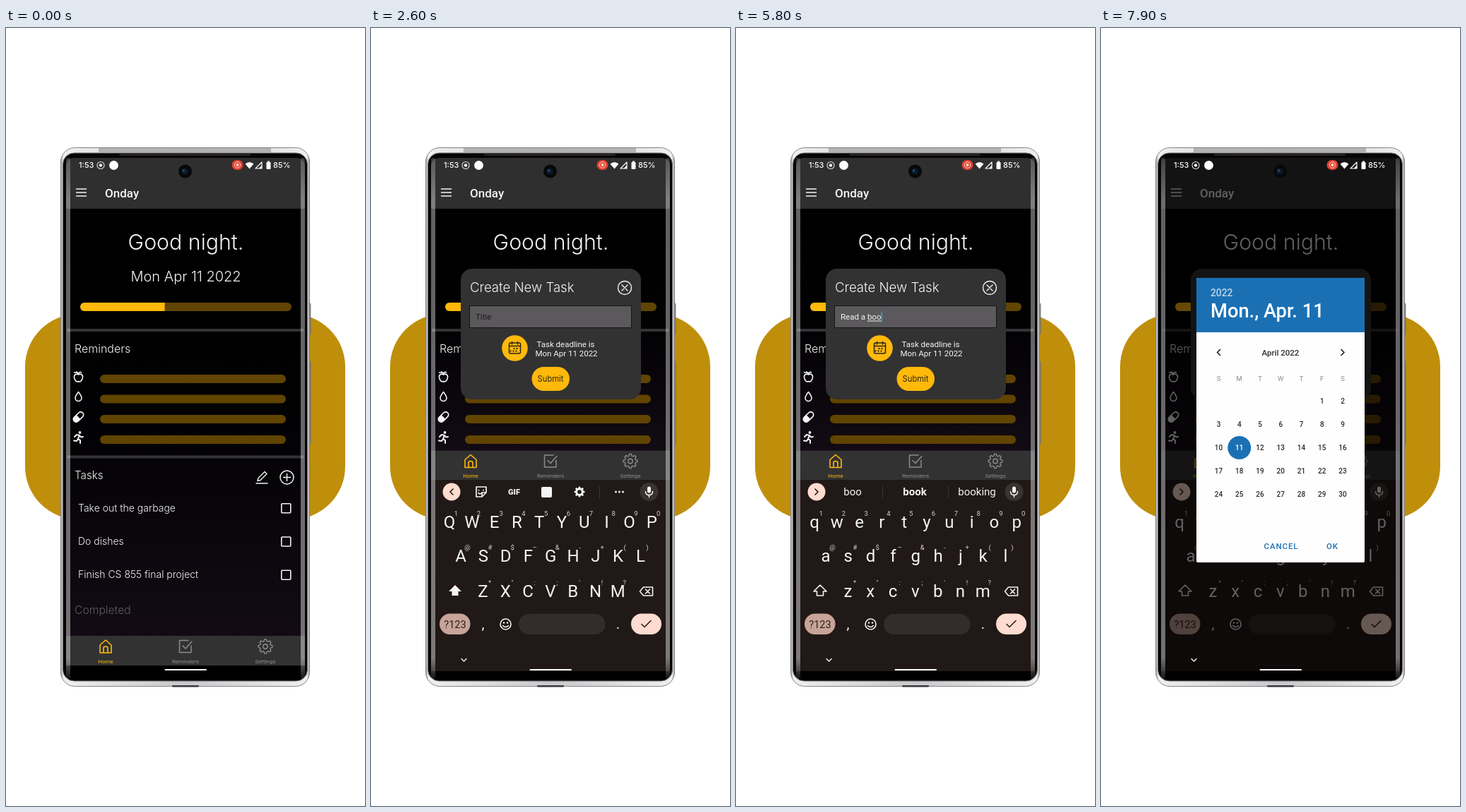
These frames come from a looping animation (508x1102 px, 8 s). An HTML page with a canvas:

```html
<!DOCTYPE html>
<html lang="en">
<head>
<meta charset="utf-8">
<title>Task app</title>
<style>
html, body { margin: 0; width: 100%; height: 100%; overflow: hidden; background: #fff; }
canvas { display: block; width: 508px; height: 1102px; }
</style>
</head>
<body>
<canvas id="stage" width="508" height="1102"></canvas>
<script>
const ctx = document.getElementById('stage').getContext('2d');
const LOOP = 8000, STEP = 100;
const GOLD = '#ffb90a', TRACK = '#604400', WHITE = '#f4f4f4', PEACH = '#ffdccf', PANEL = '#323232';
const INTER = 'Inter, sans-serif', ROBOTO = 'Roboto, sans-serif';

const TASKS = ['Take out the garbage', 'Do dishes', 'Finish CS 855 final project'];
const STROKES = [[3500, 'R'], [3700, 'e'], [4000, 'a'], [4300, 'd'], [4600, ' '], [5000, 'a'],
  [5200, ' '], [5300, 'b'], [5600, 'o'], [5700, 'o'], [5900, 'k']];
const HINTS = ['', 'R Really Right', 'Re Really Red', 'Rea Res Real', 'Read Reading Ready', 'the a it',
  'a and an', 'book good little', 'b bit book', 'bo book box', 'boo book booking', 'book booking booklet'];
const ROWS = [
  { keys: 'QWERTYUIOP', marks: '1234567890', x: 111, y: 699 },
  { keys: 'ASDFGHJKL', marks: '@#$–&-+()', x: 127, y: 747 },
  { keys: 'ZXCVBNM', marks: '*":;\'!?', x: 158.5, y: 797 }
];
const KEY_STEP = 31.8;

const clamp = v => Math.max(0, Math.min(1, v));

function box(x, y, w, h, r, fill, stroke, lw = 1) {
  ctx.beginPath();
  ctx.roundRect(x, y, w, h, r);
  if (fill) { ctx.fillStyle = fill; ctx.fill(); }
  if (stroke) { ctx.strokeStyle = stroke; ctx.lineWidth = lw; ctx.stroke(); }
}

function disc(x, y, r, fill, stroke, lw = 1) {
  box(x - r, y - r, 2 * r, 2 * r, r, fill, stroke, lw);
}

// y is the middle of the capital letters
function text(s, x, y, size, color = WHITE, { font = ROBOTO, weight = 400, align = 'left', spacing = 0 } = {}) {
  ctx.font = `${weight} ${size}px ${font}`;
  ctx.letterSpacing = spacing + 'px';
  ctx.textAlign = align;
  ctx.fillStyle = color;
  ctx.fillText(s, x, y + size * 0.36);
}

const geo = (s, x, y, size, color, opts) => text(s, x, y, size, color, { font: INTER, weight: 300, ...opts });
const mid = (s, x, y, size, color, opts) => text(s, x, y, size, color, { align: 'center', ...opts });

// Icon paths are centred on the origin
function icon(d, x, y, { color = WHITE, lw = 1.5, fill = false, scale = 1 } = {}) {
  ctx.save();
  ctx.translate(x, y);
  ctx.scale(scale, scale);
  ctx.lineCap = ctx.lineJoin = 'round';
  ctx.lineWidth = lw;
  ctx.strokeStyle = ctx.fillStyle = color;
  const p = new Path2D(d);
  fill ? ctx.fill(p) : ctx.stroke(p);
  ctx.restore();
}

function gear(x, y, r, color, solid) {
  ctx.beginPath();
  for (let i = 0; i <= 96; i++) {
    const a = i / 96 * Math.PI * 2, q = r * (0.88 + 0.12 * Math.tanh(3 * Math.cos(8 * a)));
    ctx.lineTo(x + q * Math.cos(a), y + q * Math.sin(a));
  }
  ctx.closePath();
  if (solid) {
    ctx.fillStyle = color;
    ctx.fill();
    disc(x, y, r * 0.38, '#211917');
  } else {
    ctx.strokeStyle = color;
    ctx.lineWidth = 1.4;
    ctx.stroke();
    disc(x, y, r * 0.32, null, color, 1.4);
  }
}

function withAlpha(a, draw) {
  if (a <= 0) return;
  ctx.save();
  ctx.globalAlpha *= a;
  draw();
  ctx.restore();
}

function drawPhone() {
  box(27, 405, 453, 291, 75, '#bf8f0b');
  box(428, 390, 3, 44, 1, '#8b8b8b', '#555', 0.6);
  box(428, 472, 3, 118, 1, '#8b8b8b', '#555', 0.6);
  const metal = ctx.createLinearGradient(77, 0, 430, 0);
  metal.addColorStop(0, '#8d8b8e');
  metal.addColorStop(0.012, '#efeff0');
  metal.addColorStop(0.5, '#c9c7c9');
  metal.addColorStop(0.988, '#efeff0');
  metal.addColorStop(1, '#8d8b8e');
  box(77.5, 169.5, 352, 763, 20, metal, '#858386');
  box(131, 170, 244, 6, 0, '#b4b1b3');
  box(80.5, 177, 346, 748, 16, '#050505', '#77757a');
  box(160, 178, 186, 3, 2, '#272122');
  box(235, 931, 38, 2.5, 1, '#39373a');
}

function drawPhoneGlass() {
  for (const x of [85, 417]) {
    const g = ctx.createLinearGradient(0, 184, 0, 922);
    g.addColorStop(0, 'rgba(255,255,255,.2)');
    g.addColorStop(0.08, 'rgba(255,255,255,.38)');
    g.addColorStop(0.96, 'rgba(255,255,255,.42)');
    g.addColorStop(1, 'rgba(255,255,255,.08)');
    box(x, 184, 6, 738, 3, g);
  }
  disc(253.5, 203, 9.5, '#08080a');
  disc(253, 203, 4.5, '#0d1a2b');
  disc(251.5, 202, 1.5, '#2a5684');
}

function drawStatus() {
  const opts = { font: INTER, weight: 500 };
  text('1:53', 103, 194.5, 11, '#fff', opts);
  disc(134, 194.5, 5, null, '#ddd', 1.1);
  disc(134, 194.5, 2.3, '#eee');
  disc(152.5, 194.5, 6.5, '#fff');
  box(319.5, 187, 16, 14, 7, '#e2402f');
  disc(327.5, 194, 4.3, null, '#ffd9d3', 1);
  disc(327.5, 194, 2, '#ffd9d3');
  icon('M0 5L-6 -2Q0 -7 6 -2Z', 344.5, 194.5, { fill: true, color: '#fff' });
  icon('M-4.5 4.5H4.5V-4.5Z', 357.5, 194.5, { lw: 1.2, color: '#fff' });
  icon('M0 4.5H4.5V0Z', 357.5, 194.5, { fill: true, color: '#fff' });
  box(368.5, 190, 6, 10, 1, '#fff');
  box(370, 188.5, 3, 2, 0, '#fff');
  text('85%', 378, 194.5, 11, '#fff', opts);
}

function drawHeader() {
  box(85, 184, 338, 72, [10, 10, 0, 0], '#302f30');
  for (const y of [228, 233, 238]) box(99, y - 0.8, 15, 1.6, 0, WHITE);
  text('Onday', 140, 233.5, 17, WHITE, { weight: 500 });
}

function drawTask(name, y, done) {
  const color = done ? '#676468' : WHITE;
  geo(name, 102, y, 14, color);
  if (done) {
    box(389, y - 7, 15, 15, 2, '#676468');
    icon('M-4 0L-1 3L4.5 -3', 396.5, y + 0.5, { color: '#100b12', lw: 1.7 });
  } else {
    box(389.8, y - 6.2, 13, 13, 1, null, WHITE, 1.6);
  }
}

function drawReminders() {
  geo('Reminders', 97, 454, 16);
  for (const y of [497, 525.5, 554, 583]) box(133, y - 6, 263, 12, 6, TRACK);
  icon('M0 -3C-3 -5 -6.5 -3 -6 1C-5.5 5 -2.5 8 0 6.5C2.5 8 5.5 5 6 1C6.5 -3 3 -5 0 -3ZM0 -3Q0 -6 -3 -7M-6 -6H-2M0 -4Q2 -8 4 -6', 102.5, 494, { lw: 1.6 });
  icon('M0 -6.5C-3 -2.5 -4.5 0 -4.5 2A4.5 4.5 0 0 0 4.5 2C4.5 0 3 -2.5 0 -6.5Z', 102.5, 522, { lw: 1.6 });
  ctx.save();
  ctx.translate(102.5, 551);
  ctx.rotate(-Math.PI / 4);
  box(-8.5, -4, 17, 8, 4, null, WHITE, 1.7);
  box(-8.5, -4, 8.5, 8, [4, 0, 0, 4], WHITE);
  ctx.restore();
  disc(104.5, 573, 1.9, WHITE);
  icon('M-5 -1L-2 -4L2 -3L0 2L3 4V8M0 2L-2 5L-6 4.5M2 -3L4 -0.5L7 -1', 102, 580, { lw: 2 });
}

function drawHome(t, bottom) {
  const bg = ctx.createLinearGradient(0, 256, 0, bottom);
  bg.addColorStop(0, '#000');
  bg.addColorStop(0.5, '#020103');
  bg.addColorStop(1, '#120b14');
  ctx.save();
  ctx.beginPath();
  ctx.rect(85, 256, 338, bottom - 256);
  ctx.clip();
  box(85, 256, 338, bottom - 256, 0, bg);

  geo('Good night.', 254.5, 303.5, 30.3, WHITE, { align: 'center' });
  geo('Mon Apr 11 2022', 254.5, 352, 20, WHITE, { align: 'center' });
  const advance = start => clamp((t - start) / 300);
  const progress = 0.4 + 0.2 * (advance(200) + advance(1000));
  box(105, 389, 299, 12, 6, TRACK);
  box(105, 389, 299 * progress, 12, [6, 0, 0, 6], GOLD);
  box(86, 426, 335, 4, 0, '#343335');

  drawReminders();
  box(86, 605.5, 335, 4, 0, '#343335');

  geo('Tasks', 97, 634, 15.2);
  icon('M-6 4L-5 0L4 -9L7 -6L-2 3ZM-8 7.5H8', 362, 637.5, { lw: 1.4 });
  disc(397.5, 636.5, 9.5, null, WHITE, 1.5);
  icon('M-5 0H5M0 -5V5', 397.5, 636.5);

  const doneCount = (t >= 300) + (t >= 1100);
  let y = 680;
  for (const name of TASKS.slice(doneCount)) { drawTask(name, y, false); y += 47.2; }
  y += 2.5;
  geo('Completed', 97, y, 15.7, '#5f5c60');
  y += 46.5;
  for (const name of TASKS.slice(0, doneCount)) { drawTask(name, y, true); y += 47.2; }

  const touch = (start, x, cy) => {
    if (t >= start && t < start + 200) disc(x, cy, 10 + (t - start) / 20, 'rgba(255,255,255,.16)');
  };
  touch(200, 396.5, 680);
  touch(1000, 396.5, 680);
  touch(1900, 397.5, 636.5);
  ctx.restore();
}

function drawTabs(top) {
  const grey = '#8c8c8c', y = top + 15;
  box(85, top, 338, 42, 0, PANEL);
  icon('M-8 -2L0 -9L8 -2V9H-8ZM-3 9V2.5Q-3 0 0 0Q3 0 3 2.5V9', 141, y, { color: GOLD, lw: 1.6 });
  icon('M8 -1V8.5H-8.5V-8.5H4M-4 -1L0 3L9 -7', 254, y, { color: grey });
  gear(367, y, 10, grey);
  ['Home', 'Reminders', 'Settings'].forEach((s, i) =>
    mid(s, 141 + 113 * i, top + 36, 8, i ? grey : GOLD));
}

function drawModal(typed, caret) {
  box(127, 341, 255, 185, 16, PANEL);
  geo('Create New Task', 140, 367.5, 18.6);
  disc(359, 368, 9.5, null, WHITE, 1.4);
  icon('M-4 -4L4 4M4 -4L-4 4', 359, 368, { lw: 1.4 });
  box(139.5, 393.5, 229, 31, 0, '#5b595b', '#161616');
  text(typed || 'Title', 148, 409, 11.5, typed ? WHITE : '#1b1b1b');
  const end = 148 + (typed ? ctx.measureText(typed).width : 0);
  const word = typed.split(' ').pop();
  if (word) {
    const w = ctx.measureText(word).width;
    box(end - w, 414.5, w, 1, 0, WHITE);
  }
  if (caret) box(end, 401.5, 1.5, 15, 0, '#25a7d8');

  disc(203.5, 453.5, 18.3, GOLD);
  box(195.5, 446, 16, 15, 2, null, '#2a2416', 1.5);
  icon('M-8 -3.5H8M-4 -9.5V-6M4 -9.5V-6', 203.5, 454, { color: '#2a2416' });
  for (let i = 1; i < 6; i++) box(196.5 + 4 * (i % 3) + (i > 2 ? 0 : 1), i > 2 ? 456.5 : 453, 2, 2, 0, '#2a2416');
  mid('Task deadline is', 275.5, 447.5, 11.5);
  mid('Mon Apr 11 2022', 276.5, 461, 11.5);
  box(227.5, 480, 53.5, 34, 17, GOLD);
  geo('Submit', 254, 496.5, 11.2, '#2a2416', { align: 'center', weight: 400 });
}

function drawSuggestions(typed) {
  const dark = '#2a1e1a', line = '#3c3532';
  disc(114, 657, 12.5, PEACH);
  icon(typed ? 'M-2 -4L2 0L-2 4' : 'M2 -4L-2 0L2 4', 114, 657, { color: dark, lw: 1.7 });
  disc(393.5, 657, 13, '#3a3330');
  box(391, 649.5, 5, 9, 2.5, WHITE);
  icon('M-5 -1Q-5 4 0 4Q5 4 5 -1M0 4V7', 393.5, 657.5);
  if (typed) {
    HINTS[typed.length].split(' ').forEach((s, i) =>
      mid(s, 165 + 88 * i, 657, 15, WHITE, { weight: s === 'book' && i === 1 && typed.endsWith('boo') ? 700 : 400 }));
    box(207, 649, 1, 17, 0, line);
    box(300, 649, 1, 17, 0, line);
    return;
  }
  icon('M7 1V-7H-7V7H1ZM7 1H1V7M-3.5 -2.5V-2M3 -2.5V-2M-4 1.5Q-2 4 0 2', 156, 657, { lw: 1.7 });
  mid('GIF', 202.5, 657.5, 11, WHITE, { weight: 900 });
  box(241, 650, 15, 15, 2, WHITE);
  gear(295, 657, 7.5, WHITE, true);
  box(323, 649, 1, 17, 0, line);
  for (const x of [346.5, 351.5, 356.5]) disc(x, 657, 1.5, WHITE);
}

function drawKeys(typed, pressed) {
  const setCase = s => typed ? s.toLowerCase() : s;
  let popup;
  for (const { keys, marks, x, y } of ROWS) {
    [...keys].forEach((key, i) => {
      const kx = x + KEY_STEP * i, held = pressed && pressed.toUpperCase() === key;
      if (held) popup = { x: kx, y: y - 56, s: setCase(key) };
      withAlpha(held ? 0.35 : 1, () => {
        mid(setCase(key), kx, y, 24);
        mid(marks[i], kx + 9.5, y - 11, 9.5, '#d8d0cd');
      });
    });
  }
  icon('M0 -8L9 1H4.5V7H-4.5V1H-9Z', 119, 797, { fill: !typed, lw: 1.6 });
  icon('M-9 0L-4 -6H9V6H-4ZM-1 -3L5 3M5 -3L-1 3', 389.5, 798, { lw: 1.6 });

  box(97, 829.5, 43.5, 29.5, 15, '#c7a497');
  mid('?123', 119, 844.5, 14.5, '#2a1e1a');
  mid(',', 158.5, 844, 20);
  disc(190.5, 844.5, 7.5, null, WHITE, 1.6);
  disc(188, 842.5, 1.2, WHITE);
  disc(193, 842.5, 1.2, WHITE);
  icon('M-4 2Q0 6 4 2', 190.5, 844.5, { lw: 1.6 });
  box(209, 830, 122.5, 29, 15, pressed === ' ' ? '#48413e' : '#332c2a');
  mid('.', 349.5, 844, 20);
  box(368, 829.5, 43, 29.5, 15, PEACH);
  icon('M-6 0L-2 4L7 -5', 389, 844.5, { color: '#2a1e1a', lw: 1.6 });

  if (popup) {
    disc(popup.x, popup.y, 33, '#302928');
    mid(popup.s, popup.x, popup.y, 31);
    for (const dx of [-3.5, 0, 3.5]) disc(popup.x + dx, popup.y + 27, 1, WHITE);
  }
}

function drawKeyboard(rise, typed, pressed) {
  ctx.save();
  ctx.beginPath();
  ctx.rect(85, 639, 338, 272);
  ctx.clip();
  ctx.translate(0, 270 * (1 - rise));
  box(85, 640, 338, 272, 0, '#211917');
  drawSuggestions(typed);
  drawKeys(typed, pressed);
  ctx.restore();
}

function drawPicker() {
  const blue = '#1b70b4', ink = '#2c2c2c', medium = { weight: 500 };
  const column = c => 166.5 + 29.25 * c;
  box(135, 354, 238, 403, 2, '#fefefe');
  box(135, 354, 238, 77, [2, 2, 0, 0], blue);
  text('2022', 155, 375.5, 13.8, '#bcd5e8', medium);
  text('Mon., Apr. 11', 155, 400, 27.3, '#fff', medium);
  mid('April 2022', 254, 459.5, 11.5, ink, medium);
  icon('M2 -4L-2 0L2 4', 166.5, 459.5, { color: '#222', lw: 1.7 });
  icon('M-2 -4L2 0L-2 4', 342, 459.5, { color: '#222', lw: 1.7 });
  [...'SMTWTFS'].forEach((s, i) => mid(s, column(i), 497, 9.5, '#8a8a8a'));
  disc(195.75, 594.5, 16.5, blue);
  for (let day = 1; day <= 30; day++) {
    const slot = day + 4;
    mid(day, column(slot % 7), 528 + 33 * Math.floor(slot / 7), 10, day === 11 ? '#fff' : ink, medium);
  }
  mid('CANCEL', 255, 734, 11.5, blue, { weight: 500, spacing: 0.9 });
  mid('OK', 327.5, 734, 11.5, blue, { weight: 500, spacing: 0.9 });
}

function drawScene(t) {
  const modal = [0, 0.35, 0.8, 1][Math.max(0, Math.min(3, (t - 1900) / STEP))];
  const rise = t < 2200 ? 0 : t < 2300 ? 0.6 : 1;
  const typed = STROKES.filter(([at]) => t >= at + STEP).map(([, key]) => key).join('');
  const held = STROKES.find(([at]) => t >= at && t < at + STEP);
  const caret = (t >= 2300 && t < 2600) || (t >= 3100 && t < 6500);
  const picker = t < 6700 ? 0 : Math.min(1, 0.2 + (t - 6700) / STEP * 0.3);
  const tabTop = rise ? 598.5 : 861;

  ctx.fillStyle = '#fff';
  ctx.fillRect(0, 0, 508, 1102);
  drawPhone();
  ctx.save();
  ctx.beginPath();
  ctx.roundRect(85, 184, 338, 738, 10);
  ctx.clip();
  box(85, 184, 338, 738, 0, '#000');
  drawHeader();
  drawHome(t, tabTop);
  drawTabs(tabTop);
  withAlpha(modal, () => {
    ctx.translate(0, 131 * (1 - rise));
    drawModal(typed, caret);
  });
  if (rise) drawKeyboard(rise, typed, held && held[1]);
  withAlpha(picker, () => box(85, 184, 338, 738, 0, 'rgba(0,0,0,.6)'));
  withAlpha(picker, drawPicker);
  if (rise) icon('M-3.5 -1.5L0 2L3.5 -1.5', 131.5, 895, { lw: 1.4 });
  box(224.5, 908, 59.5, 2, 1, '#fff');
  ctx.restore();
  drawPhoneGlass();
  drawStatus();
}

function tick() {
  const t = performance.now() % LOOP;
  drawScene(Math.floor(t / STEP) * STEP);
  requestAnimationFrame(tick);
}
tick();
</script>
</body>
</html>
```
